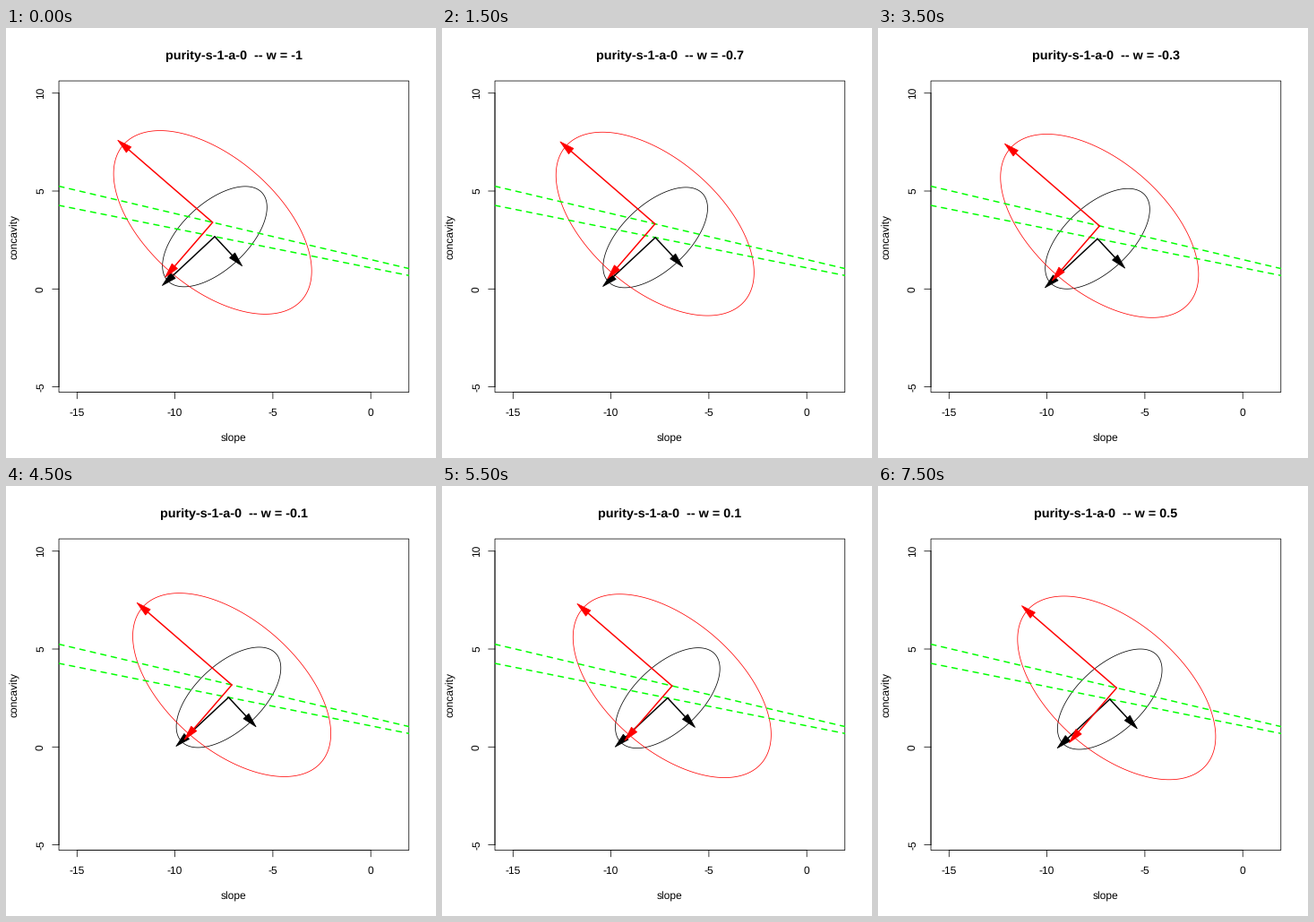
A matplotlib script that plays this animation: 480 px wide and 480 px high, repeating every 8 s.

```python
import numpy as np
import matplotlib.pyplot as plt
from matplotlib.animation import FuncAnimation
from matplotlib.patches import Polygon, Rectangle

SIZE, DPI = 480, 72
FRAMES, INTERVAL = 16, 500
LEFT, RIGHT, TOP, BOTTOM = 59.04, 449.76, 59.04, 406.56
THIN, THICK = 0.75, 1.5
TICK = 7.2
HEAD = np.array([[8.1, 0], [-8.1, 4.1], [-8.1, -4.1]])

plt.rcParams.update({"font.family": "Liberation Sans", "text.hinting": "none",
                     "path.simplify": False})

# All coordinates are stage pixels, y pointing down.
fig = plt.figure(figsize=(SIZE / DPI, SIZE / DPI), dpi=DPI, facecolor="white")
ax = fig.add_axes([0, 0, 1, 1])
ax.set_xlim(0, SIZE)
ax.set_ylim(SIZE, 0)
ax.axis("off")

frame = Rectangle((LEFT, TOP), RIGHT - LEFT, BOTTOM - TOP, fill=False,
                  ec="black", lw=THIN, snap=False)
ax.add_patch(frame)


def line(xs, ys, color="black", lw=THIN, **kw):
    return ax.plot(xs, ys, color=color, lw=lw, snap=False, **kw)[0]


def label(x, y, text, size=12, **kw):
    return ax.text(x, y, text, size=size, ha="center", va="baseline",
                   rotation_mode="anchor", **kw)


class Arrow:
    """Arrow whose head is centred on the end of its shaft."""

    def __init__(self, vec, color, z):
        self.vec = vec
        ux, uy = vec / np.hypot(*vec)
        self.shape = HEAD @ np.array([[ux, uy], [-uy, ux]]) + vec
        self.shaft = line([], [], color, THICK, zorder=z,
                          solid_capstyle="round")
        self.head = Polygon(self.shape, closed=True, fc=color, ec=color,
                            lw=THIN, joinstyle="round", zorder=z)
        ax.add_patch(self.head)

    def move(self, center):
        self.shaft.set_data(*np.array([center, center + self.vec]).T)
        self.head.set_xy(self.shape + center)


class Ellipse:
    """Ellipse with its two axis arrows, sliding along a dashed line."""

    def __init__(self, color, x0, step, y_left, slope, major, minor, angle, z):
        self.x0, self.step, self.y_left, self.slope = x0, step, y_left, slope
        c, s = np.cos(np.radians(angle)), np.sin(np.radians(angle))
        a, b = np.array([c, s]) * major, np.array([-s, c]) * minor
        t = np.linspace(0, 2 * np.pi, 200)[:, None]
        self.curve = a * np.cos(t) + b * np.sin(t)
        self.outline = line([], [], color, zorder=z)
        self.arrows = [Arrow(v, color, z + 2) for v in (a, b)]

        path = line([LEFT, RIGHT], [self.y_at(LEFT), self.y_at(RIGHT)],
                    "#00ff00", THICK, ls=(0, (4, 4)),
                    dash_capstyle="round", zorder=3)
        path.set_clip_path(frame)

    def y_at(self, x):
        return self.y_left + self.slope * (x - LEFT)

    def move(self, k):
        x = self.x0 + self.step * k
        center = np.array([x, self.y_at(x)])
        self.outline.set_data(*(self.curve + center).T)
        for arrow in self.arrows:
            arrow.move(center)


xticks = 79.3 + 109.3 * np.arange(4)
yticks = 72.7 + 109.3 * np.arange(4)
line(xticks[[0, -1]], [BOTTOM, BOTTOM])
line([LEFT, LEFT], yticks[[0, -1]])
for x, value in zip(xticks, (-15, -10, -5, 0)):
    line([x, x], [BOTTOM, BOTTOM + TICK])
    label(x, 432.6, str(value))
for y, value in zip(yticks, (10, 5, 0, -5)):
    line([LEFT - TICK, LEFT], [y, y])
    label(41.9, y, str(value), rotation=90)
label(254.4, 461.7, "slope")
label(13.4, 232.8, "concavity", rotation=90)
title = label(254.4, 35, "", size=14.4, weight="bold")

black = Ellipse("black", 233, 1.715, 198, 0.2003, 72, -36.8, 137, 2)
red = Ellipse("red", 230.65, 2.38, 176.6, 0.2353, 132, -72.7, 220.9, 2.5)


def draw(k):
    title.set_text(f"purity-s-1-a-0  -- w = {(k - 10) / 10:g}")
    black.move(k)
    red.move(k)


anim = FuncAnimation(fig, draw, frames=FRAMES, interval=INTERVAL,
                     init_func=lambda: draw(0), repeat=True, blit=False)
plt.show()
```
